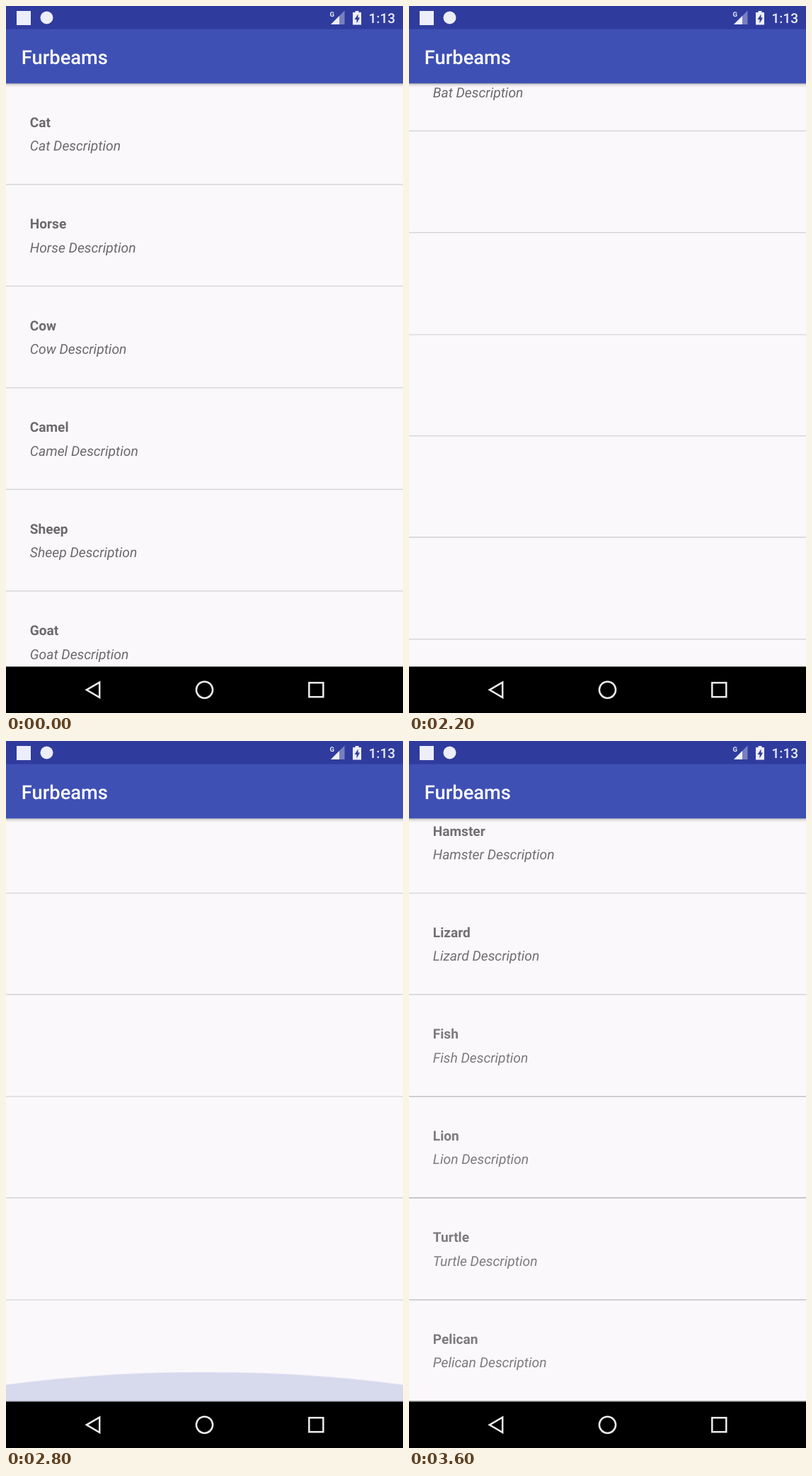
Animation of 561x998 px, one loop 8000 ms. Source, as an HTML page:

```html
<!DOCTYPE html>
<html lang="en">
<head>
<meta charset="utf-8">
<title>Furbeams</title>
<style>
  html, body { margin: 0; width: 100%; height: 100%; overflow: hidden; background: #faf8fb; }
  svg {
    display: block; width: 561px; height: 998px;
    font: 19.1px Roboto, sans-serif; text-rendering: geometricPrecision;
  }

  .label { fill: #6b696c; }
  .name { font-weight: 700; }
  .desc { font-style: italic; font-size: 19.34px; }
  .line { fill: #d8d6d9; }

  #first, #last, #glow, .loading, .settling {
    animation: 8s step-end infinite;
  }
  #first { animation-name: leave; }
  #last { animation-name: scroll; }
  #glow { animation-name: glow; fill: #3f51b5; transform-origin: 0 932.5px; }
  .loading { animation-name: load; }
  .settling { animation-name: settle; }
  .late { fill-opacity: .92; }

  @keyframes leave {
    0% { visibility: visible; }
    27.5%, 100% { visibility: hidden; }
  }
  @keyframes scroll {
    0% { visibility: hidden; transform: none; }
    27.5% { visibility: visible; transform: none; }
    28.75%, 100% { visibility: visible; transform: translateY(-105.3px); }
  }
  /* Overscroll glow: swells on impact, then recedes quadratically. */
  @keyframes glow {
    0% { opacity: 0; transform: scaleY(0); }
    30% { opacity: .42; transform: scaleY(.603); }
    31.25% { opacity: .49; transform: scaleY(.973); }
    32.5% { opacity: .41; transform: scaleY(.816); }
    33.75% { opacity: .285; transform: scaleY(.571); }
    35% { opacity: .185; transform: scaleY(.37); }
    36.25% { opacity: .106; transform: scaleY(.212); }
    37.5% { opacity: .05; transform: scaleY(.098); }
    40%, 100% { opacity: 0; transform: scaleY(0); }
  }
  @keyframes load {
    0% { opacity: 0; }
    42.5% { opacity: .3; }
    43.75% { opacity: .65; }
    45%, 100% { opacity: .96; }
  }
  @keyframes settle {
    0% { fill: #d8d6d9; }
    40%, 100% { fill: #bbb9bc; }
  }
</style>
</head>
<body>
<svg viewBox="0 0 561 998">
  <defs>
    <linearGradient id="shade" x2="0" y2="1">
      <stop stop-color="#000" stop-opacity=".32"/>
      <stop offset=".4" stop-color="#000" stop-opacity=".1"/>
      <stop offset="1" stop-color="#000" stop-opacity="0"/>
    </linearGradient>
  </defs>
  <rect width="561" height="998" fill="#faf8fb"/>
  <g id="first"></g>
  <g id="last"></g>
  <circle id="glow" cx="280.5" cy="1661.2" r="841.5"/>

  <rect y="109" width="561" height="6" fill="url(#shade)"/>
  <rect y="32" width="561" height="77.2" fill="#3f50b5"/>
  <rect width="561" height="32.7" fill="#303c9d"/>
  <text x="21.8" y="81.5" font-size="27.3" font-weight="500" fill="#fff">Furbeams</text>

  <g fill="#eceefa">
    <rect x="15" y="7" width="20" height="20"/>
    <circle cx="57.5" cy="16.5" r="9"/>
    <text x="457.5" y="15" font-size="9.5" font-weight="700">G</text>
    <path d="M459 26L478.500 26V6.500Z" opacity=".38"/>
    <path d="M459 26H471V14Z"/>
    <path d="M493.500 7H498.500V9H502V26.500H490V9H493.500Z"/>
    <path d="M497.500 11.500L492.500 19H495.500V24.500L500 16.500H497.500Z" fill="#303c9d"/>
    <text x="512.5" y="24" font-weight="500">1:13</text>
  </g>

  <rect y="932.5" width="561" height="66" fill="#000"/>
  <g fill="none" stroke="#ececec" stroke-width="2.5">
    <path d="M113.800 965.300L132.200 954.600V976Z"/>
    <circle cx="280.5" cy="965.3" r="11.6"/>
    <rect x="428.3" y="955.3" width="20" height="20"/>
  </g>
</svg>
<script>
  const PITCH = 143.46;

  function row(name, y, textClass = '', lineClass = '') {
    return `<g transform="translate(0 ${y})">
      <g class="label ${textClass}">
        <text class="name" x="33.8" y="61.8">${name}</text>
        <text class="desc" x="33.8" y="95">${name} Description</text>
      </g>
      <rect class="line ${lineClass}" y="142" width="561" height="1.5"/>
    </g>`;
  }

  function fill(id, names, top, classes = () => []) {
    document.getElementById(id).innerHTML = names
      .map((name, i) => row(name, top + i * PITCH, ...classes(i)))
      .join('');
  }

  fill('first', ['Cat', 'Horse', 'Cow', 'Camel', 'Sheep', 'Goat'], 109.2);
  fill('last', ['Bat', 'Hamster', 'Lizard', 'Fish', 'Lion', 'Turtle', 'Pelican'], 33.6, i => [
    i > 2 ? 'loading late' : i > 0 ? 'loading' : '',
    i > 2 ? 'settling' : ''
  ]);
</script>
</body>
</html>
```
